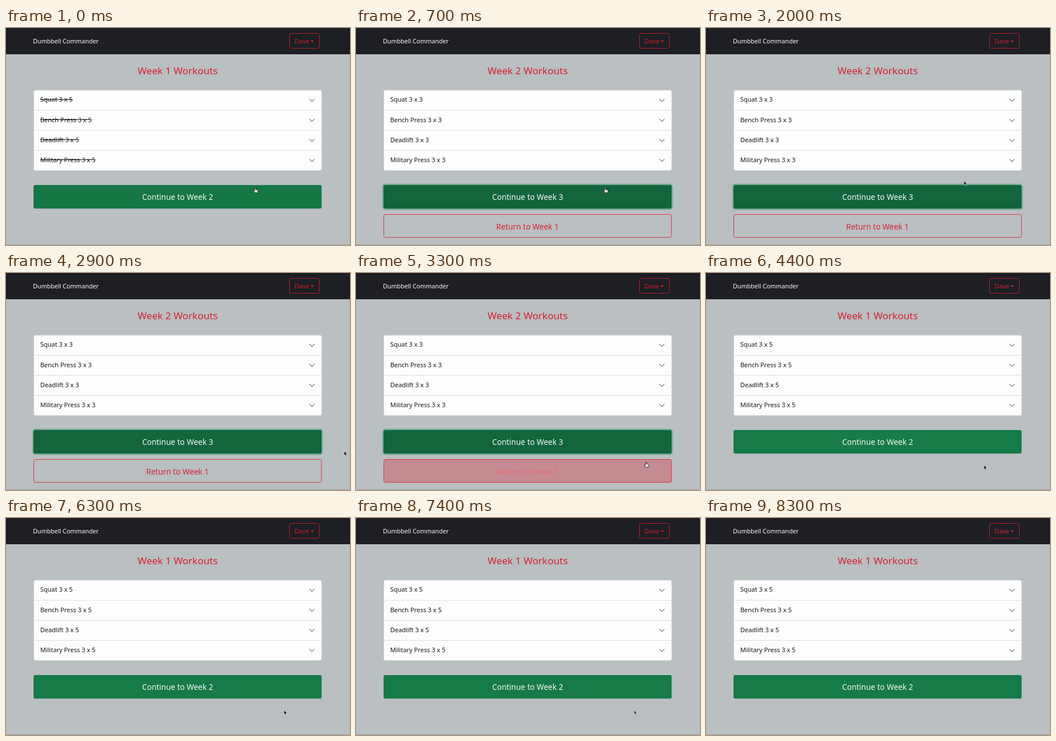
Write an HTML page that moves like this. It is 600 px wide and 380 px high and loops after 8500 ms.

```html
<!DOCTYPE html>
<html lang="en">
<head>
<meta charset="utf-8">
<title>Weekly workouts</title>
<style>
  html, body { margin: 0; width: 100%; height: 100%; overflow: hidden; background: #babfc1; }
  svg { display: block; width: 100%; height: 100%; }
  text { font-family: "Noto Sans", "Open Sans", sans-serif; }
  .mid { text-anchor: middle; }
  .item { font-size: 11px; font-weight: 500; fill: #151618; }
  .label { font-size: 13.5px; text-anchor: middle; fill: #f4f8f6; }
  .chevron { fill: none; stroke: #25282c; stroke-width: 1; stroke-linecap: round; stroke-linejoin: round; }
</style>
</head>
<body>
<svg viewBox="0 0 600 380">
  <rect width="600" height="380" fill="#babfc1"/>
  <rect width="600" height="46" fill="#1d1f24"/>
  <rect y="379.3" width="600" height=".7" fill="#909496"/>

  <text x="47" y="27" font-size="10.7" font-weight="500" fill="#fafafa">Dumbbell Commander</text>
  <rect x="494.5" y="9.5" width="52" height="26" rx="3" fill="none" stroke="#b7212f"/>
  <text x="503" y="27.3" font-size="11" fill="#cb2231">Dave</text>
  <path d="M531 21.7h6.4l-3.2 3.2z" fill="#cb2231"/>

  <text id="title" class="mid" x="299.5" y="81" font-size="17.1" font-weight="500" fill="#d61f30"></text>

  <rect x="48.5" y="109" width="502" height="140.5" rx="3" fill="#fdfdfd" stroke="#d3d6d8" stroke-width=".8"/>
  <g id="list"></g>

  <rect id="nextGlow" x="46.9" y="273.9" width="504.7" height="43.4" rx="4" fill="none" stroke="#3c996e" stroke-opacity=".55" stroke-width="2.2"/>
  <rect id="next" x="48" y="275" width="502.5" height="41.2" rx="3"/>
  <text id="nextLabel" class="label" x="299.3" y="301.4"></text>

  <g id="back">
    <rect id="backGlow" x="46.9" y="325.2" width="504.7" height="43.2" rx="4" fill="none" stroke="#dc3545" stroke-opacity=".5" stroke-width="2.2"/>
    <rect id="backBox" x="48.5" y="326.5" width="501.7" height="40.2" rx="3" fill="#d62a39" stroke="#d62a39" stroke-width=".9"/>
    <text id="backLabel" class="label" x="299.2" y="352.8">Return to Week 1</text>
  </g>

  <g id="cursor">
    <circle id="ring" cx=".3" cy=".4" r="16.7" fill="none" stroke="#25282a" stroke-width="1"/>
    <path id="arrow" d="M0 0V7.4L1.7 5.9L2.8 8.4L4 7.9L2.9 5.4H5.2Z" fill="#080808" stroke="#eee" stroke-width=".6"/>
    <g id="hand">
      <path d="M-1.2 .8Q-1.2 -.2 -.4 -.2Q.5 -.2 .5 .8V3.3L3.5 3.9Q4.8 4.3 4.7 5.5L4.1 9.2H-.5L-3 5.8Q-3.2 4.7 -2.2 4.9L-1.2 5.8Z" fill="#fff" stroke="#111" stroke-width=".9" stroke-linejoin="round"/>
      <path d="M.7 6V7.9M2.3 6V7.9" stroke="#333" stroke-width=".5"/>
    </g>
  </g>
</svg>
<script>
const LOOP = 8500, STEP = 100;
const LIFTS = ["Squat", "Bench Press", "Deadlift", "Military Press"];

// Moments of the story, in ms
const PRESS_NEXT = 200, WEEK_2 = 400, LEAVE = 2000, ENTER_BACK = 3200;
const PRESS_BACK = 4100, WEEK_1 = 4300, FADE = 7300, GONE = 7700;

// Pointer path: time, x, y
const PATH = [
  [0, 435, 279.5], [1900, 435, 279.5], [2000, 450, 268], [2300, 520, 266],
  [2600, 575, 285], [2900, 590, 312], [3100, 566, 326], [3300, 506, 331],
  [3500, 488, 335], [3700, 485, 336.5]
];

const $ = id => document.getElementById(id);
const set = (id, name, value) => $(id).setAttribute(name, value);
const show = (id, on) => set(id, "visibility", on ? "visible" : "hidden");
const within = (t, a, b) => t >= a && t < b;
const mix = (a, b, p) => a + (b - a) * p;

$("list").innerHTML = LIFTS.map((_, i) => {
  const y = 109 + i * 35.1;
  const rule = i ? `<path d="M48.5 ${y}H550.5" stroke="#d9dbdc"/>` : "";
  return `${rule}<text class="item" x="59.7" y="${y + 20.4}"></text>
    <path class="chevron" d="M529.6 ${y + 15.6}l4 4.1l4 -4.1"/>`;
}).join("");
const items = [...document.querySelectorAll(".item")];

function pointerAt(t) {
  const i = PATH.findIndex(p => p[0] > t);
  if (i < 0) return PATH[PATH.length - 1].slice(1);
  const [t0, x0, y0] = PATH[i - 1], [t1, x1, y1] = PATH[i];
  const p = (t - t0) / (t1 - t0);
  return [mix(x0, x1, p), mix(y0, y1, p)];
}

function drawPage(t) {
  const second = within(t, WEEK_2, WEEK_1);
  const week = second ? 2 : 1;
  $("title").textContent = `Week ${week} Workouts`;
  $("nextLabel").textContent = `Continue to Week ${week + 1}`;
  items.forEach((item, i) => {
    item.textContent = `${LIFTS[i]} 3 x ${second ? 3 : 5}`;
    item.setAttribute("text-decoration", t < WEEK_2 ? "line-through" : "none");
  });

  const focused = within(t, PRESS_NEXT, WEEK_1);
  set("next", "fill", focused ? "#13653d" : t < PRESS_NEXT ? "#157646" : "#177a49");
  set("nextGlow", "visibility", within(t, PRESS_NEXT + STEP, PRESS_BACK + STEP) ? "visible" : "hidden");

  set("back", "display", second ? "inline" : "none");
  const hover = t <= ENTER_BACK ? 0 : t <= ENTER_BACK + STEP ? 0.35 : 1;
  set("backBox", "fill-opacity", hover);
  $("backLabel").style.fill =
    `rgb(${mix(214, 250, hover)},${mix(36, 242, hover)},${mix(52, 243, hover)})`;
  show("backGlow", within(t, PRESS_BACK + STEP, WEEK_1));
}

function drawPointer(t) {
  const [x, y] = pointerAt(t);
  const hand = t < LEAVE || within(t, ENTER_BACK, WEEK_1);
  set("cursor", "transform", `translate(${x} ${y})`);
  set("cursor", "opacity", 1 - Math.min(1, Math.max(0, (t - FADE) / (GONE - FADE))));
  show("hand", hand);
  show("arrow", !hand);
  show("ring", within(t, PRESS_NEXT, WEEK_2) || within(t, PRESS_BACK, WEEK_1));
}

function render(ms) {
  const t = Math.floor((ms % LOOP) / STEP) * STEP;
  drawPage(t);
  drawPointer(t);
}

const start = performance.now();
function tick() {
  render(performance.now() - start);
  requestAnimationFrame(tick);
}
tick();
</script>
</body>
</html>
```
